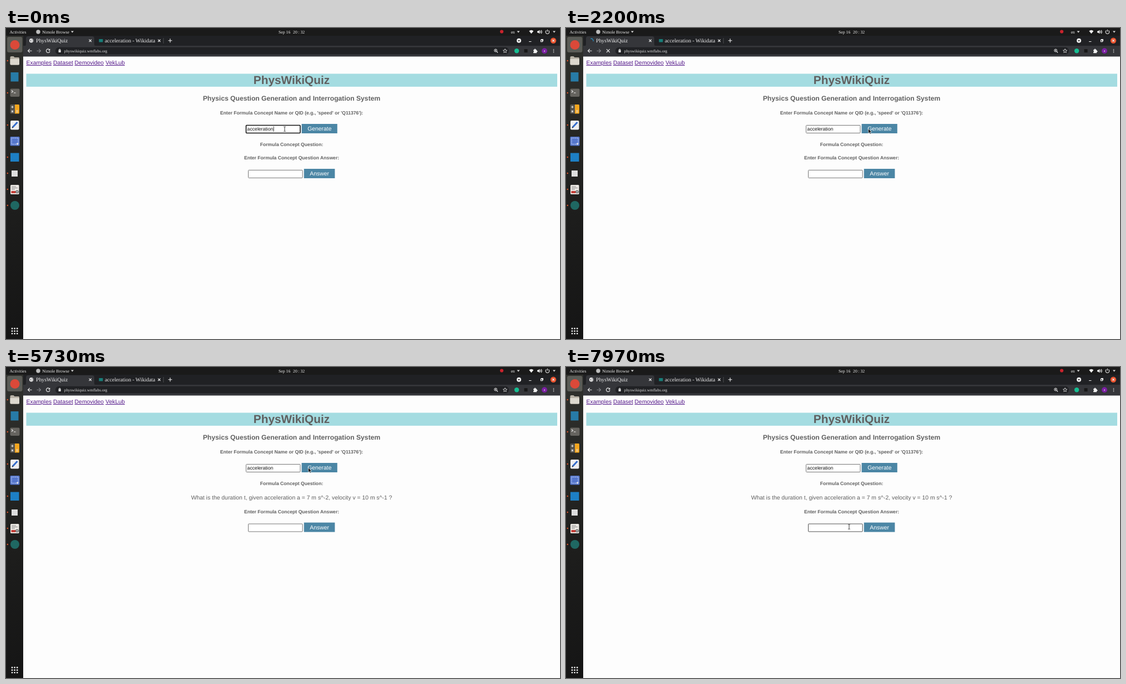
Recreate the animation shown at these times as an HTML page. Size 998 px wide and 561 px high, loop 8 s.

```html
<!DOCTYPE html>
<html lang="en">
<head>
<meta charset="utf-8">
<title>Physics quiz demo</title>
<style>
  html, body { margin: 0; width: 100%; height: 100%; overflow: hidden; background: #fdfdfd; }
  svg { display: block; width: 998px; height: 561px; }
  text { font-family: "Liberation Sans", Arial, sans-serif; font-size: 10.4px; fill: #606060;
         text-rendering: geometricPrecision; white-space: pre; }
  .ui text { font-family: "Liberation Serif", "Times New Roman", serif; font-size: 7.75px; fill: #f0f0f0; }
  .ui .tab { font-size: 9.8px; }
  .ui .url { font-size: 7.3px; fill: #e4e4e4; }
  .mid { text-anchor: middle; }
  .h1 { font-size: 20.8px; font-weight: bold; }
  .h3 { font-size: 12.17px; font-weight: bold; }
  .h5 { font-size: 8.63px; font-weight: bold; }
  .field { font-size: 8.67px; fill: #111; }
  .link { fill: #551a8b; text-decoration: underline; }
  .button { fill: #4b86a5; }
  .on { fill: #fff; }
  .input { fill: #fff; stroke: #777; stroke-width: 1; }
  .line { fill: none; stroke: #eee; stroke-width: 1.1; }
</style>
</head>
<body>
<svg viewBox="0 0 998 561">
  <defs>
    <linearGradient id="dockFill" x2="0" y2="1">
      <stop stop-color="#30312d"/><stop offset=".6" stop-color="#1d1d1c"/><stop offset="1" stop-color="#151515"/>
    </linearGradient>
  </defs>
  <rect width="998" height="561" fill="#fdfdfd"/>

  <g id="page">
    <text class="link" x="36.5" y="66">Examples</text>
    <text class="link" x="85" y="66">Dataset</text>
    <text class="link" x="123.6" y="66">Demovideo</text>
    <text class="link" x="179.3" y="66">VekLub</text>
    <rect x="36.5" y="82.5" width="956.5" height="23.4" fill="#a4dce1"/>
    <text class="mid h1" x="514.5" y="101.3">PhysWikiQuiz</text>
    <text class="mid h3" x="514.5" y="130.8">Physics Question Generation and Interrogation System</text>
    <text class="mid h5" x="514.5" y="156">Enter Formula Concept Name or QID (e.g., 'speed' or 'Q11376'):</text>
    <rect id="nameBox" class="input" x="432.5" y="175.5" width="97.5" height="14" rx="1"/>
    <text class="field" x="434.6" y="185.1">acceleration</text>
    <path id="caret" d="M482.2 177.5v9.5" stroke="#111" stroke-width=".8"/>
    <rect class="button" x="532.6" y="173" width="64.2" height="17"/>
    <text class="mid on" x="564.8" y="185.3">Generate</text>
    <text class="mid h5" x="514.5" y="212.5">Formula Concept Question:</text>
    <text id="question" class="mid" x="514.5" y="238.6">What is the duration t, given acceleration a = 7 m s^-2, velocity v = 10 m s^-1 ?</text>
    <g id="answer">
      <text class="mid h5" x="514.5" y="237">Enter Formula Concept Question Answer:</text>
      <rect id="answerBox" class="input" x="436.5" y="256.4" width="97.7" height="14" rx="1"/>
      <rect class="button" x="536.8" y="254" width="55.6" height="17"/>
      <text class="mid on" x="564.7" y="266.2">Answer</text>
    </g>
  </g>

  <g class="ui">
    <rect width="998" height="14" fill="#1a1a1a"/>
    <text x="6.4" y="9.8">Activities</text>
    <circle cx="58" cy="7" r="3.7" fill="#bdbdbd"/>
    <text x="65.2" y="9.8">Nimole Browse</text>
    <path d="M117 5.5h5l-2.5 3zM920.5 5.5h5l-2.5 3zM985 5.5h5l-2.5 3z" fill="#ddd"/>
    <text x="491" y="10">Sep 16</text>
    <text x="517" y="10">20</text><text x="526.2" y="9.6">:</text><text x="530.4" y="10">32</text>
    <circle cx="893" cy="6.5" r="3.1" fill="#c9232d"/>
    <text x="909.4" y="9.6">en</text>
    <path d="M942.3 5.5q4-3.6 8 0l-4 4.8zM957 5.5h2l2.3-2v7l-2.3-2h-2z" fill="#eee"/>
    <path class="line" stroke-width=".8" d="M962.5 5q1.5 2 0 4M964 3.8q2.5 3 0 6.4M973.5 4.5a3.3 3.3 0 1 0 3.8 0M975.4 2.8v3.6"/>

    <rect x="31" y="14" width="967" height="19" fill="#202124"/>
    <path d="M32 33q4 0 4-4V19q0-4 4-4h115q4 0 4 4v10q0 4 4 4z" fill="#35363a"/>
    <rect x="31" y="32" width="967" height="19.5" fill="#35363a"/>
    <rect x="89" y="34.8" width="817" height="12.8" rx="6.4" fill="#202124"/>
    <g id="globe">
      <circle cx="45.6" cy="22.8" r="3.7" fill="#eee"/>
      <path d="M43 21.5l2 1.2-.5 2M46.5 20.2l1 1.6 1.3.4M47 25.2l1-1.3" stroke="#45464a" fill="none" stroke-width=".9"/>
    </g>
    <path id="spinner" fill="none" stroke="#289ad2" stroke-width="1.2"/>
    <text class="tab" x="54" y="26">PhysWikiQuiz</text>
    <rect x="167.5" y="20" width="7" height="5.5" fill="#187d78"/>
    <text class="tab" x="178" y="26">acceleration - Wikidata</text>
    <path class="line" d="M149.6 20.6l4.4 4.4m0-4.4l-4.4 4.4M273.8 20.6l4.4 4.4m0-4.4l-4.4 4.4M292.2 22.8h7M295.7 19.3v7"/>
    <path d="M283.7 18v10" stroke="#55565a" stroke-width=".8"/>
    <circle cx="924" cy="22.8" r="4" fill="#f2f2f2"/>
    <path d="M922 22h4l-2 2.4z" fill="#222"/>
    <path class="line" stroke-width=".9" d="M942 24.5h4.4M963.4 21.6h3v3h-3zM964.4 21.4v-.9h3v3h-.9"/>
    <circle cx="986" cy="22.8" r="5.2" fill="#e9542f"/>
    <path class="line" d="M984.2 21l3.6 3.6m0-3.6l-3.6 3.6"/>

    <path class="line" d="M46.5 41.2h-7m3.3-3.2l-3.3 3.2 3.3 3.2"/>
    <path class="line" style="stroke:#85868a" d="M55.5 41.2h7m-3.3-3.2l3.3 3.2-3.3 3.2"/>
    <g id="reload"><path class="line" d="M78.4 39.2a3.3 3.3 0 1 0 .6 2.8"/><path d="M79.4 37.4v3.3h-3.3z" fill="#eee"/></g>
    <path id="stop" class="line" d="M73 38.2l5.8 5.8m0-5.8l-5.8 5.8"/>
    <path d="M94.6 40h4.2v4h-4.2z" fill="#ddd"/>
    <path class="line" stroke-width=".8" d="M95.5 40.2v-1q1.2-1.8 2.4 0v1"/>
    <text class="url" x="104.8" y="43.9">physwikiquiz.wmflabs.org</text>
    <circle class="line" style="stroke-width:.9" cx="882" cy="40.5" r="2.5"/>
    <path class="line" stroke-width=".9" d="M884 42.5l2 2M880.8 40.5h2.4M882 39.3v2.4"/>
    <path class="line" style="stroke-width:.8" d="M899 37.6l1 2.4 2.6.2-2 1.7.6 2.6-2.2-1.4-2.2 1.4.6-2.6-2-1.7 2.6-.2z"/>
    <circle cx="920" cy="41.2" r="4.2" fill="#16bd91"/>
    <rect x="933.5" y="38.2" width="6" height="6" fill="#171717"/>
    <path d="M950 39.2h1.8a1.3 1.3 0 1 1 2.4 0h1.8v1.8a1.2 1.2 0 1 1 0 2.3v1.9h-6v-2a1.1 1.1 0 0 0 0-2.2z" fill="#f0f0f0"/>
    <circle cx="970" cy="41.2" r="5" fill="#7b1fa2"/>
    <text class="mid" x="970" y="43.4" style="font-size:6.5px">a</text>
    <path d="M986.5 38.2v6.5" stroke="#eee" stroke-width="1.4" stroke-dasharray="1.4 1.1"/>
  </g>

  <g id="dock">
    <rect y="14" width="31" height="547" fill="url(#dockFill)"/>
    <rect x="2" y="16" width="27.5" height="28" rx="3" fill="#5b5c57"/>
    <circle cx="16" cy="30.5" r="8.5" fill="#db4939"/>
    <path d="M7.5 53q0-2 2-2h4l2 2h7q1.5 0 1.5 2v9.5q0 2-2 2h-12.5q-2 0-2-2z" fill="#b7b1a5"/>
    <path d="M7.5 56h16.500v9q0 1.500-1.500 1.500h-13.500q-1.500 0-1.500-1.500z" fill="#dcd8ce"/>
    <rect x="8.500" y="80" width="14" height="16.500" fill="#277ba7"/>
    <rect x="7.500" y="109.500" width="17" height="14.500" rx="2" fill="#66645f"/>
    <path class="line" d="M10 112.500l2.500 2-2.500 2M14 117h3.500"/>
    <rect x="7.500" y="138" width="16.500" height="16.500" rx="1.500" fill="#56544f"/>
    <path d="M16 138h6.500q1.500 0 1.500 1.500v13.500q0 1.500-1.500 1.500H16z" fill="#f2a51f"/>
    <path class="line" d="M9.500 142.500h4M11.500 140.500v4M10 149l3 3m0-3l-3 3M18 149h4M18 151.500h4"/>
    <rect x="8" y="167" width="15.500" height="16.500" rx="2" fill="#eeeef0"/>
    <path d="M12 179l8.500-9" stroke="#346ccc" stroke-width="3"/>
    <path d="M10.500 180.700l.7-3 2.200 2z" fill="#333"/>
    <rect x="7.500" y="196" width="17" height="16.500" rx="1.500" fill="#5677cc"/>
    <rect x="10" y="198.500" width="12" height="11" fill="none" stroke="#c9d6fa" stroke-dasharray="2 1"/>
    <path class="line" d="M20.500 207v4M18.500 209h4"/>
    <rect x="8" y="225.500" width="15.500" height="15.500" fill="#1d7fc4"/>
    <rect x="10" y="257" width="11" height="11" fill="#dedede"/>
    <rect x="8" y="283" width="15.500" height="17" rx="1.500" fill="#ece9e4"/>
    <path d="M10 286h8M10 288.500h11M10 291h6" stroke="#888" stroke-width="1"/>
    <path d="M9.500 294h8v4h-8z" fill="#c43c35"/>
    <circle cx="20" cy="295.500" r="2.500" fill="#aaa" stroke="#555"/>
    <circle cx="16" cy="320" r="8" fill="#1f6762"/>
    <g id="dots" fill="#e0552b"></g>
    <g id="apps" fill="#f0f0f0"></g>
  </g>

  <g id="pointer">
    <path id="arrow" d="M0 0v8.300l2-1.800 1.300 3 1.500-.7-1.300-2.900h2.600z" fill="#151515" stroke="#fff" stroke-width=".6"/>
    <path id="beam" d="M-1.800-4q1.500 0 1.800.7.300-.7 1.800-.7M0-3.300v7.100M-1.800 4.500q1.500 0 1.800-.7.300.7 1.800.7" fill="none" stroke="#222" stroke-width=".9"/>
  </g>
</svg>
<script>
const LOOP = 8000, CLICK = 1000, LOADED = 3900, SHIFT = 26.6;
const $ = id => document.getElementById(id);
const show = (id, on) => $(id).setAttribute("visibility", on ? "visible" : "hidden");

// time, x, y
const path = [
  [0, 502, 182], [350, 502, 182], [850, 544.6, 181.7], [6750, 544.6, 181.7],
  [7350, 522, 242.3], [7450, 522, 242.3], [7850, 510, 288], [LOOP, 510, 288]
];
// left, top, right, bottom of everything that calls for the text cursor
const textAreas = [[432, 175, 530, 190], [458, 204, 571, 214], [333, 229, 696, 241], [429, 255, 600, 265], [436, 282, 535, 298]];

$("dots").innerHTML = [59, 117, 175, 233, 262, 291, 320].map(y => `<circle cx="2.8" cy="${y}" r="1.2"/>`).join("");
$("apps").innerHTML = Array.from({ length: 9 }, (_, i) =>
  `<rect x="${9.7 + i % 3 * 4.6}" y="${540.8 + Math.floor(i / 3) * 4.6}" width="2.600" height="2.600" rx=".8"/>`).join("");

function pointerAt(t) {
  const i = path.findIndex((p, k) => k && t <= p[0]);
  const [t0, x0, y0] = path[i - 1], [t1, x1, y1] = path[i];
  const u = (t - t0) / (t1 - t0), e = u * u * (3 - 2 * u);
  return [x0 + (x1 - x0) * e, y0 + (y1 - y0) * e];
}

function arc(cx, cy, r, mid, sweep) {
  const at = deg => {
    const a = deg * Math.PI / 180;
    return `${cx + r * Math.cos(a)} ${cy + r * Math.sin(a)}`;
  };
  return `M${at(mid - sweep / 2)}A${r} ${r} 0 0 1 ${at(mid + sweep / 2)}`;
}

function draw(t) {
  const focused = t < CLICK, loaded = t >= LOADED, loading = !focused && !loaded;
  const [x, y] = pointerAt(t);
  const overText = textAreas.some(([l, top, r, b]) => x > l && x < r && y > top && y < b);

  $("pointer").setAttribute("transform", `translate(${x} ${y})`);
  show("beam", overText);
  show("arrow", !overText);

  $("nameBox").style.stroke = focused ? "#111" : "#777";
  $("nameBox").style.strokeWidth = focused ? 1.6 : 1;
  show("caret", focused && t < 500);

  show("globe", !loading);
  show("reload", !loading);
  show("stop", loading);
  show("spinner", loading);
  $("spinner").setAttribute("d", arc(45.6, 22.8, 3.6, 115 + (t - 1400) * 445 / 1770, 130));

  show("question", loaded);
  $("answer").setAttribute("transform", `translate(0 ${loaded ? SHIFT : 0})`);
  $("answerBox").style.stroke = loaded && overText && y > 282 ? "#505050" : "#777";
}

const start = performance.now();
function tick() {
  draw((performance.now() - start) % LOOP);
  requestAnimationFrame(tick);
}
tick();
</script>
</body>
</html>
```
